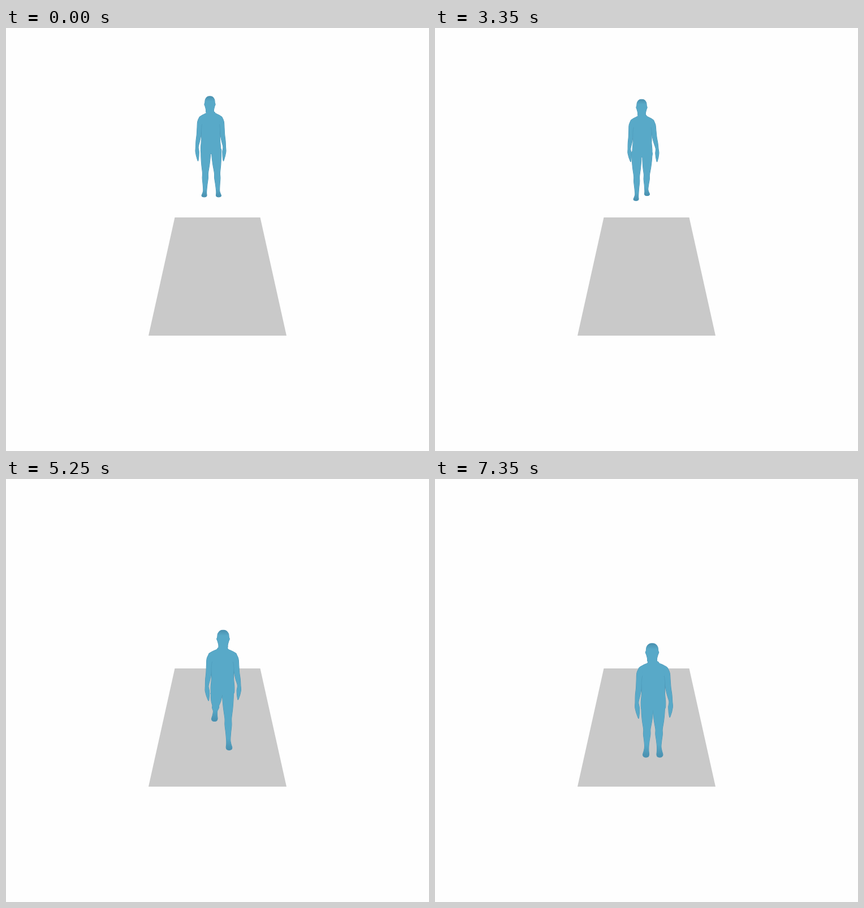
Write an HTML page with a canvas that moves like this. It is 748x748 px and loops after 7.4 s.

```html
<!DOCTYPE html>
<html lang="en">
<head>
<meta charset="utf-8">
<title>Walking figure</title>
<style>
  html, body { margin: 0; width: 100%; height: 100%; overflow: hidden; background: #fefefe; }
  canvas { display: block; width: 748px; height: 748px; }
</style>
</head>
<body>
<canvas id="stage" width="748" height="748"></canvas>
<script>
const ctx = document.getElementById('stage').getContext('2d');
const LOOP = 7400, TICK = 50, SWING = 750, STRIDE = 1150;
const SKIN = '#58a9c8', EDGE = '#4b95b5', SHADE = '#498fae';

// key points of the body: time, head x, head top, torso x
const BODY = [
  [0, 360.5, 120.5, 362],
  [1500, 361.5, 118.3, 363],
  [2250, 363.5, 111, 364.5],
  [3350, 365.5, 126, 366.5],
  [4100, 360.5, 166.5, 363],
  [4550, 373.5, 195.5, 373.5],
  [5250, 384, 267, 383],
  [5650, 391, 283, 390.5],
  [6300, 386.5, 290, 387],
  [7350, 384, 290.5, 386]
];

// footfalls: landing time, toe x, toe y
const LEFT = [
  [0, 350.5, 299], [2250, 347.5, 290], [3300, 355.5, 305.5],
  [4650, 366, 410], [5680, 373, 492]
];
const RIGHT = [
  [0, 376, 299], [2250, 375, 290], [3050, 375, 297],
  [4040, 375.5, 350], [5150, 394.5, 479.5], [5950, 397.5, 492]
];

// half outlines: half-width, distance below the head top
const HEAD = [
  [0, .3], [4.8, 1.5], [8, 6], [8.8, 12], [9.6, 14.5],
  [8.2, 18.5], [6.9, 24], [6.3, 29], [0, 32]
];
const TORSO = [
  [0, 27], [6.3, 28], [8.5, 30.5], [15, 33.8], [20.5, 38],
  [20, 46], [17.3, 54], [16.2, 73], [17.4, 92], [15, 101], [0, 102]
];
// arm: outward, down, half-width
const ARM = [
  [17.5, 38, 2.2], [19.3, 45, 3.9], [20, 56, 4], [20.9, 68, 3.8],
  [22.6, 79, 3.4], [24.2, 90, 2.3], [23.8, 99, 3], [22.6, 113, .7]
];
// leg: share of the way from hip to ankle, half-width
const LEG = [
  [-.15, 7.6], [0, 8.4], [.28, 7.1], [.52, 5], [.66, 5.1], [.84, 3.8], [1, 3]
];

const mix = (a, b, k) => a + (b - a) * k;
const ease = (from, to, t) => {
  const u = Math.min(1, Math.max(0, (t - from) / (to - from)));
  return u * u * (3 - 2 * u);
};

// Hermite interpolation without overshoot
function sample(rows, t) {
  const last = rows.length - 1;
  let i = 0;
  while (i < last - 1 && rows[i + 1][0] <= t) i++;
  const a = rows[i], b = rows[i + 1], span = b[0] - a[0];
  const u = (t - a[0]) / span;
  const slope = (n, c) => (rows[n + 1][c] - rows[n][c]) / (rows[n + 1][0] - rows[n][0]);
  const tangent = (n, c) => {
    if (n === 0 || n === last) return 0;
    const p = slope(n - 1, c), q = slope(n, c);
    return p * q <= 0 ? 0 : 2 * p * q / (p + q);
  };
  return a.slice(1).map((v, n) => {
    const c = n + 1;
    return v + (b[c] - v) * u * u * (3 - 2 * u)
      + span * u * (1 - u) * ((1 - u) * tangent(i, c) - u * tangent(i + 1, c));
  });
}

// a planted foot stays still, then swings to the next footfall
function foot(falls, t, k) {
  let [, x, y] = falls[0];
  for (const [land, nextX, nextY] of falls.slice(1)) {
    const start = land - SWING, e = ease(start, land, t);
    if (e === 0) break;
    const lift = Math.abs(nextY - y) * .1 * (1 + .9 * k);
    const u = Math.min(1, (t - start) / SWING);
    x = mix(x, nextX, e);
    y = mix(y, nextY, e) - lift * Math.sin(Math.PI * u);
  }
  return [x, y];
}

// closed smooth curve through the points
function smooth(pts) {
  const path = new Path2D(), n = pts.length, at = i => pts[(i + n) % n];
  path.moveTo(...pts[0]);
  for (let i = 0; i < n; i++) {
    const [p, a, b, q] = [at(i - 1), at(i), at(i + 1), at(i + 2)];
    path.bezierCurveTo(
      a[0] + (b[0] - p[0]) / 6, a[1] + (b[1] - p[1]) / 6,
      b[0] - (q[0] - a[0]) / 6, b[1] - (q[1] - a[1]) / 6, b[0], b[1]);
  }
  path.closePath();
  return path;
}

function mirrored(half, x, y, sx, sy) {
  const right = half.map(([w, d]) => [x + w * sx, y + d * sy]);
  const left = half.slice(1, -1).reverse().map(([w, d]) => [x - w * sx, y + d * sy]);
  return smooth(right.concat(left));
}

function limb(pts) {
  const right = pts.map(([x, y, w]) => [x + w, y]);
  const left = pts.map(([x, y, w]) => [x - w, y]).reverse();
  return smooth(right.concat(left));
}

function arm(side, x, y, sx, sy, out, down) {
  return limb(ARM.map(([dx, d, w]) => {
    const reach = Math.max(0, (d - 42) / 71) ** 1.4;
    return [x + side * (dx * sx + out * reach), y + d * sy + down * reach, w * sx];
  }));
}

function leg(side, hipX, hipY, k, [toeX, toeY]) {
  const length = mix(11.5, 19, k), s = mix(1, 1.22, k);
  const ankleX = toeX - side * 1.3, ankleY = toeY - length;
  const bend = Math.max(0, 1 - (ankleY - hipY) / mix(64, 53, k));
  const topX = hipX + side * mix(9.4, 10.3, k);
  const pts = LEG.map(([f, w]) => {
    const g = f > 0 ? f + bend * f * (1 - f) : f;
    return [mix(topX, ankleX, g), mix(hipY, ankleY, g), w * s];
  });
  pts.push(
    [mix(ankleX, toeX, .5), toeY - length * .6, 3.5 * s],
    [toeX, toeY - length * .22, 4.5 * s],
    [toeX, toeY - .5, 2.6 * s]);
  const fill = ctx.createLinearGradient(0, ankleY - 3, 0, toeY);
  fill.addColorStop(0, SKIN);
  fill.addColorStop(1, SHADE);
  return [limb(pts), fill];
}

function ground() {
  ctx.fillStyle = '#c9c9c9';
  ctx.beginPath();
  ctx.moveTo(298.5, 335);
  ctx.lineTo(449.5, 335);
  ctx.lineTo(496, 544);
  ctx.lineTo(252, 544);
  ctx.fill();
}

function figure(t) {
  const [headX, top, x] = sample(BODY, t);
  // the nearer the figure, the more the camera looks down on it
  const k = Math.min(1, Math.max(0, (top - 120) / 170) ** 1.6);
  const sx = mix(1, 1.25, k), sy = mix(1, 1.16, k);

  const left = foot(LEFT, t, k), right = foot(RIGHT, t, k);
  const hipX = mix(x, (left[0] + right[0]) / 2, .5), hipY = top + 102 * sy;
  const legs = [leg(-1, hipX, hipY, k, left), leg(1, hipX, hipY, k, right)];
  if (left[1] > right[1]) legs.reverse();

  const walk = ease(2400, 3200, t) * (1 - ease(5500, 6200, t));
  const beat = Math.cos(2 * Math.PI * (t - 4100) / STRIDE);
  const cap = ctx.createLinearGradient(0, top, 0, top + 9 * sy);
  cap.addColorStop(0, SHADE);
  cap.addColorStop(1, SKIN);

  const parts = [
    ...legs,
    [mirrored(TORSO, x, top, sx, sy), SKIN],
    [arm(-1, x, top, sx, sy, -2 * Math.max(walk, k), -4 * walk), SKIN],
    [arm(1, x, top, sx, sy, walk * (2 - 2.5 * beat) + k, -4 * walk - 2 * k), SKIN],
    [mirrored(HEAD, headX, top, mix(1, 1.22, k), mix(1, 1.12, k)), cap]
  ];

  ctx.lineJoin = ctx.lineCap = 'round';
  ctx.strokeStyle = EDGE;
  ctx.lineWidth = 1.1;
  for (const [path] of parts) ctx.stroke(path);
  for (const [path, fill] of parts) {
    ctx.fillStyle = fill;
    ctx.fill(path);
  }

  // creases between arms and chest
  ctx.globalAlpha = .55;
  ctx.lineWidth = .9;
  ctx.beginPath();
  for (const side of [-1, 1]) {
    const at = (dx, d) => [x + side * dx * sx, top + d * sy];
    ctx.moveTo(...at(15.5, 50));
    ctx.quadraticCurveTo(...at(17.4, 58), ...at(16.5, 75));
  }
  ctx.stroke();
  ctx.globalAlpha = 1;
}

function draw() {
  const t = Math.floor(performance.now() % LOOP / TICK) * TICK;
  ctx.fillStyle = '#fefefe';
  ctx.fillRect(0, 0, 748, 748);
  ground();
  figure(t);
  requestAnimationFrame(draw);
}
draw();
</script>
</body>
</html>
```
